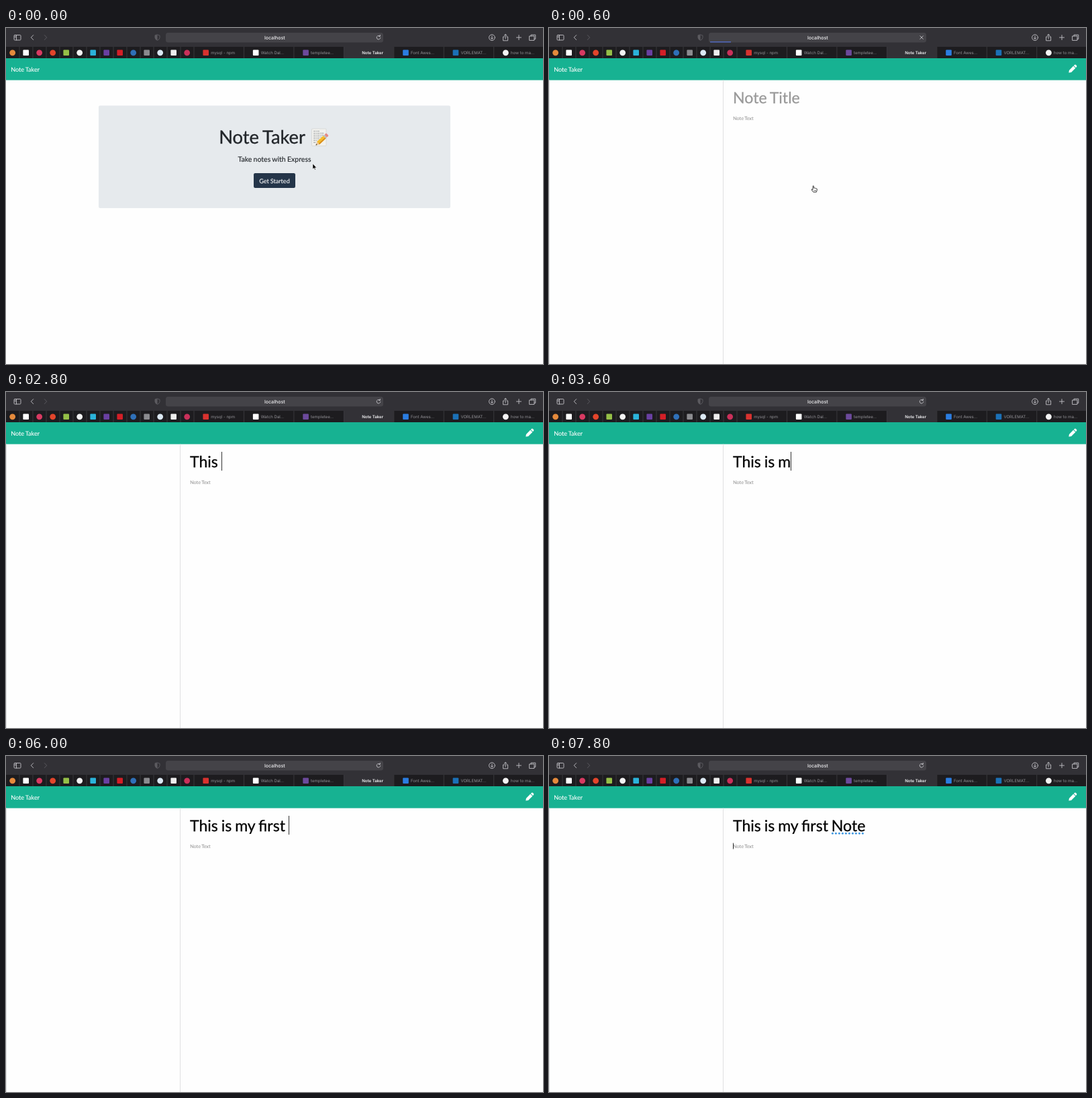
Write an HTML page that moves like this. It is 800 by 500 pixels and loops after 8000 ms.

```html
<!DOCTYPE html>
<html lang="en">
<head>
<meta charset="utf-8">
<title>Note Taker</title>
<style>
  html, body { margin: 0; width: 100%; height: 100%; overflow: hidden; background: #fefefe; }
  svg { display: block; }
  text { text-rendering: geometricPrecision; white-space: pre; }
  .ui { font-family: Inter, Roboto, sans-serif; }
  .page {
    font-family: Lato, sans-serif; word-spacing: -.045em;
    fill: currentColor; stroke: currentColor; stroke-width: .012em;
  }
  .ink { color: #212529; }
  .white { color: #fff; }
  .hint { color: #999; }
  .line { fill: none; stroke: #bdbcc1; stroke-width: .95; stroke-linecap: round; stroke-linejoin: round; }
  .dim { stroke: #5c5b60; }
</style>
</head>
<body>
<svg id="stage" width="800" height="500" viewBox="0 0 800 500">
  <rect width="800" height="500" fill="#fefefe"/>

  <!-- browser toolbar -->
  <rect width="800" height="28" fill="#323136"/>
  <rect x="238" y="7" width="324" height="14.5" rx="3.5" fill="#444348"/>
  <text class="ui" x="400.3" y="16.8" font-size="7.1" font-weight="500" fill="#f2f2f4" text-anchor="middle">localhost</text>
  <g class="line">
    <rect x="12" y="10.5" width="10" height="7.5" rx="1.2"/>
    <path d="M15.5 10.5V18M13.2 12.4h1M13.2 14h1"/>
    <path d="M40.7 10.6L37.3 14.1L40.7 17.6"/>
    <path class="dim" d="M57.3 10.6L60.7 14.1L57.3 17.6"/>
    <path class="dim" d="M225.5 10L229 11.2V14.5Q228.8 17 225.5 18.4Q222.2 17 222 14.5V11.2Z"/>
    <path d="M225.5 10V18.4Q222.2 17 222 14.5V11.2Z" stroke="none" fill="#5c5b60"/>
    <circle cx="724" cy="14.2" r="4.4"/>
    <path d="M724 11.8V16.4M722.2 14.8L724 16.5L725.8 14.8"/>
    <path d="M742.3 13H740.6V18.8H747.6V13H746M744.1 16V9.5M742.2 11.2L744.1 9.4L746 11.2"/>
    <path d="M764 10.6V17.6M760.5 14.1H767.5"/>
    <path d="M782 12V10.2H788.8V16.4H787M780 12H787V18.4H780Z"/>
    <path id="reload" d="M557 12.2A2.8 2.8 0 1 0 557.8 14.6M555.4 12.4H557.3V10.4"/>
    <path id="stop" d="M552.8 11.8L557.4 16.4M557.4 11.8L552.8 16.4"/>
  </g>
  <rect id="progress" x="240" y="20.2" width="31" height="1.2" fill="#5470d8"/>

  <!-- tab strip -->
  <rect y="28" width="800" height="17" fill="#1d1c1f"/>
  <rect x="503" y="28" width="74.5" height="17" fill="#323136"/>
  <g id="tabs"></g>

  <!-- navigation bar -->
  <rect y="45" width="800" height="32.6" fill="#17b292"/>
  <text class="page white" x="7.2" y="64.7" font-size="9.1">Note Taker</text>

  <g id="home">
    <rect x="138" y="115.5" width="524" height="152.5" rx="2" fill="#e6eaed"/>
    <text class="page ink" x="317.2" y="171.6" font-size="27.3">Note Taker</text>
    <g id="memo">
      <rect x="455.5" y="150" width="21.5" height="25.5" rx=".8" fill="#f1f1ee" stroke="#cdcdca" stroke-width=".6"/>
      <path d="M458 153.5H467M458 156.5H474M458 159.3H473M458 162.1H471M458 164.9H467M458 167.7H464M458 170.5H462" stroke="#a3a5a6" stroke-width="1" stroke-dasharray="3.2 .6 1.8 .5"/>
      <g transform="translate(461.5 174.5) rotate(-43)">
        <path d="M0 0L5 -2.8V2.8Z" fill="#e9c598"/>
        <path d="M0 0L2 -1.1V1.1Z" fill="#3b3835"/>
        <rect x="5" y="-2.8" width="13" height="5.6" fill="#f5bd2e"/>
        <rect x="5" y="1" width="13" height="1.8" fill="#d88d1e"/>
        <rect x="18" y="-2.8" width="2.2" height="5.6" fill="#b9bcc0"/>
        <rect x="20.2" y="-2.8" width="3.6" height="5.6" rx="1.4" fill="#e58a86"/>
      </g>
    </g>
    <text class="page ink" x="400" y="198.9" font-size="10.56" text-anchor="middle">Take notes with Express</text>
    <rect id="button" x="369" y="216" width="62" height="22" rx="2.2"/>
    <text class="page white" x="400" y="230.5" font-size="9.1" text-anchor="middle">Get Started</text>
  </g>

  <g id="notes">
    <path d="M.5 77.6V500M259.5 77.6V500" stroke="#dfe0e1"/>
    <g fill="#fff">
      <path d="M774.3 66.6L774.9 62.9L781.2 56.6L784.3 59.7L778 66Z"/>
      <path d="M781.9 55.9L783 54.8Q783.9 54 784.8 54.8L786 56Q786.8 56.9 786 57.8L785 59Z"/>
    </g>
    <text id="title" class="page" x="274" y="111.6" font-size="23.1" xml:space="preserve"></text>
    <g id="dots" fill="#3f97e0"></g>
    <text class="page hint" x="274.2" y="136.7" font-size="7.2">Note Text</text>
    <rect id="caret" width="1" fill="#333"/>
  </g>

  <g id="arrow">
    <path d="M0 0V8L1.9 6.3L3.1 9L4.3 8.5L3.1 5.9H5.6Z" fill="#000" stroke="#fff" stroke-width=".5"/>
  </g>
  <g id="hand">
    <path d="M-.7 .3Q0 -.6 .8 .3V3.2L2 3Q2.7 3 2.8 3.5Q4.1 3.1 4.3 4Q5.6 3.8 5.6 5V6.6L4.6 9.2H.1L-2.4 6Q-2.8 4.9 -1.9 4.8L-.7 5.7Z"
      fill="#fff" stroke="#111" stroke-width=".8" stroke-linejoin="round"/>
    <path d="M1.2 6V7.8M2.5 6V7.8M3.8 6V7.8" stroke="#111" stroke-width=".5"/>
  </g>
  <g id="beam" fill="none">
    <path d="M-2 -4.5Q-.3 -4.5 0 -3.6Q.3 -4.5 2 -4.5M0 -3.6V3.8M-2 4.6Q-.3 4.6 0 3.8Q.3 4.6 2 4.6M-1 1.5H1" stroke="#222" stroke-width=".9"/>
  </g>
</svg>
<script>
const $ = id => document.getElementById(id);

function add(parent, tag, attrs, text = '') {
  const node = document.createElementNS('http://www.w3.org/2000/svg', tag);
  for (const key in attrs) node.setAttribute(key, attrs[key]);
  node.textContent = text;
  parent.append(node);
  return node;
}

function badge(x, color, round) {
  if (round) add($('tabs'), 'circle', { cx: x, cy: 36.8, r: 4.4, fill: color });
  else add($('tabs'), 'rect', { x: x - 4.3, y: 32.5, width: 8.6, height: 8.6, rx: 1, fill: color });
}

function divider(x) {
  add($('tabs'), 'rect', { x: x - 0.5, y: 28, width: 1, height: 17, fill: '#39383c' });
}

const pinned = [
  ['#e58a3c', true], ['#ffffff'], ['#d83a62', true], ['#e2452b', true], ['#95bf47'],
  ['#f4f4f4', true], ['#2bb3da'], ['#6940a2'], ['#d31f27'], ['#2f70b8', true],
  ['#8b8b8f'], ['#dbe8f3', true], ['#eeeeee'], ['#c9305a', true]
];
pinned.forEach(([color, round], i) => {
  badge(9.7 + i * 20, color, round);
  divider(20 + i * 20);
});

const tabs = [
  ['mysql - npm', '#d8322f'], ['Watch Dal...', '#ffffff'], ['templetee...', '#6c4a9c'], ['Note Taker'],
  ['Font Awes...', '#2b7de1'], ['VORLEMAT...', '#1b70b6'], ['how to ma...', '#f4f4f4', true]
];
tabs.forEach(([label, color, round], i) => {
  const left = 280 + i * 74.45;
  if (color) badge(left + 17.7, color, round);
  add($('tabs'), 'text', {
    class: 'ui', x: left + (color ? 25.2 : 26.8), y: 39.2, 'font-size': 6.1,
    'font-weight': color ? 400 : 600, fill: color ? '#929196' : '#f2f2f4'
  }, label);
  if (i) divider(left);
});

for (let i = 0; i < 10; i++) add($('dots'), 'circle', { cx: 422.4 + i * 5, cy: 115.3, r: 1.45 });

// Each step changes only what it names.
const steps = [
  [0, { page: 'home', cursor: 'arrow', x: 457, y: 202, hover: false, loading: false, text: '', caret: '', dots: false }],
  [200, { x: 424, y: 221 }],
  [400, { cursor: 'hand', x: 393.7, y: 235, hover: true }],
  [600, { page: 'notes', loading: true }],
  [800, { cursor: 'arrow', x: 390, y: 208, loading: false }],
  [1000, { x: 377, y: 138 }],
  [1200, { cursor: 'beam', x: 370.3, y: 90.8 }],
  [1600, { caret: 'title' }],
  [2000, { caret: '' }],
  [2200, { text: 'T', caret: 'title', cursor: '' }],
  [2400, { text: 'Th' }],
  [2600, { text: 'This' }],
  [2800, { text: 'This ' }],
  [3000, { text: 'This i' }],
  [3200, { text: 'This is ' }],
  [3600, { text: 'This is m' }],
  [3800, { text: 'This is my' }],
  [4000, { text: 'This is my ' }],
  [4200, { caret: '' }],
  [4400, { caret: 'title' }],
  [4600, { text: 'This is my f' }],
  [4800, { text: 'This is my fi' }],
  [5000, { text: 'This is my fir' }],
  [5200, { text: 'This is my firs' }],
  [5400, { text: 'This is my first' }],
  [5600, { caret: '' }],
  [5800, { caret: 'title' }],
  [6000, { text: 'This is my first ' }],
  [6400, { text: 'This is my first N' }],
  [6600, { text: 'This is my first No' }],
  [6800, { text: 'This is my first Not' }],
  [7000, { text: 'This is my first Note' }],
  [7400, { caret: '', dots: true }],
  [7600, { caret: 'body' }]
];
const LOOP = 8000;

function show(id, on) { $(id).style.display = on ? '' : 'none'; }

function render(s) {
  show('home', s.page === 'home');
  show('notes', s.page === 'notes');
  show('reload', !s.loading);
  show('stop', s.loading);
  show('progress', s.loading);
  show('dots', s.dots);
  show('caret', s.caret);
  $('button').setAttribute('fill', s.hover ? '#1a2530' : '#243549');

  const title = $('title');
  title.textContent = s.text || 'Note Title';
  title.style.color = s.text ? '#000' : '#999';

  const inTitle = s.caret === 'title';
  const end = inTitle && s.text ? title.getComputedTextLength() : 0;
  const caret = $('caret');
  caret.setAttribute('x', Math.round(274 + end));
  caret.setAttribute('y', inTitle ? 89 : 129.5);
  caret.setAttribute('height', inTitle ? 28 : 9);

  for (const id of ['arrow', 'hand', 'beam']) {
    show(id, s.cursor === id);
    $(id).setAttribute('transform', `translate(${s.x} ${s.y})`);
  }
}

let last = -1;
const start = performance.now();

function tick() {
  const t = (performance.now() - start) % LOOP;
  const count = steps.filter(([at]) => at <= t).length;
  if (count !== last) {
    last = count;
    render(Object.assign({}, ...steps.slice(0, count).map(step => step[1])));
  }
  requestAnimationFrame(tick);
}
tick();
</script>
</body>
</html>
```
